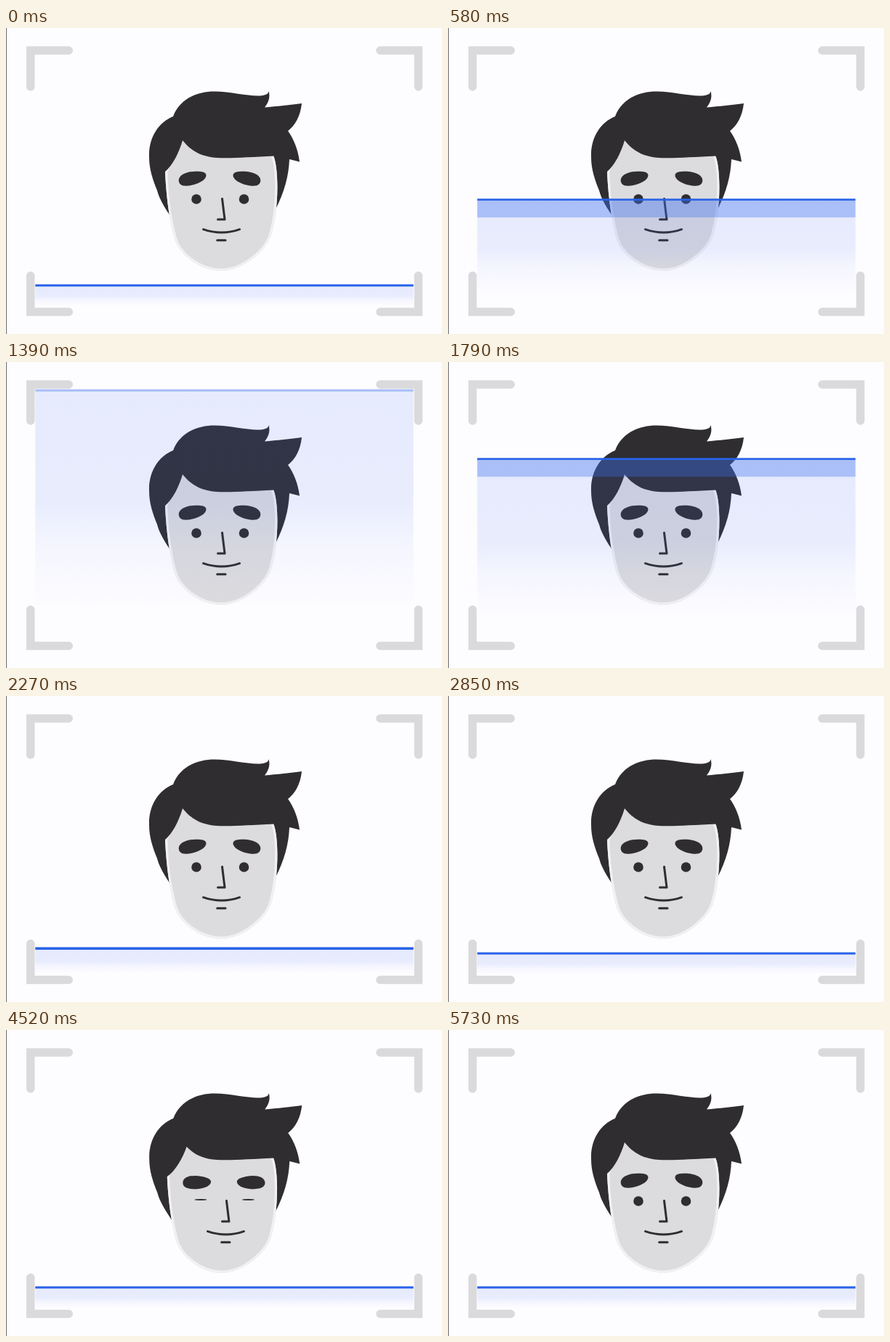
An HTML page that plays this animation: 600x422 px, repeating every 6.09 s.

```html
<!DOCTYPE html>
<html lang="en">
<head>
<meta charset="utf-8">
<title>Face scan</title>
<style>
html, body { margin: 0; width: 100%; height: 100%; overflow: hidden; background: #fdfcff; }
svg { display: block; width: 100%; height: 100%; }
</style>
</head>
<body>
<svg viewBox="0 0 600 422">
  <defs>
    <linearGradient id="fade" x1="0" y1="0" x2="0" y2="1">
      <stop offset="0" stop-color="#3e6cec" stop-opacity=".125"/>
      <stop offset=".52" stop-color="#3e6cec" stop-opacity=".108"/>
      <stop offset=".72" stop-color="#3e6cec" stop-opacity=".045"/>
      <stop offset="1" stop-color="#3e6cec" stop-opacity="0"/>
    </linearGradient>
    <path id="jaw" d="M368 176C376 195 375 250 366 282C360 308 325 335 296 335C266 335 237 312 231 288C224 262 220 225 219 198L240 152H360"/>
    <clipPath id="inside"><use href="#jaw"/></clipPath>
    <path id="brow" d="M-18.800 2.500C-19 -5 -8 -10 5 -10C13 -10 19 -9 19 -4.500C19 3 3 10 -9 10C-16 10 -18.700 6.500 -18.800 2.500Z"/>
    <path id="corner" d="M33.800 81V31H86.300"/>
  </defs>
  <rect width="600" height="422" fill="#fdfcff"/>
  <rect width="1" height="422" fill="#6a6a6d"/>

  <g fill="#2f2d30">
    <path class="hair" d="M230 122C210 130 196 151 197 178C197 195 202 209 208 224C211 236 218 247 231 267L300 210L371 250C383 226 389 205 390 181L380 130Z"/>
    <g id="face">
      <use href="#jaw" fill="#dcdbde"/>
      <use href="#jaw" fill="none" stroke="#f1f0f3" stroke-width="6.6" clip-path="url(#inside)"/>
    </g>
    <path id="lock" d="M205 198H219C229 190 238 172 243 155V125L212 150Z"/>
    <path class="hair" d="M230 122C238 100 260 87.500 287 87.500C315 88 343 97 357 92Q361 91 361.500 87C364 96 361 103 356 109.500C372 108 392 106 407 104C405 122 398 134 388 142C396 153 402 168 404 184.500L390 181L380 185L369 176.500C335 178 310 180 290 179C268 177.500 255 169.500 243 155L222 150Z"/>
    <g id="features">
      <use class="brow" href="#brow"/>
      <use class="brow" href="#brow"/>
      <ellipse class="eye" cx="262"/>
      <ellipse class="eye" cx="327.500"/>
      <g fill="none" stroke="#2f2d30" stroke-width="3" stroke-linecap="round" stroke-linejoin="round">
        <path d="M297.500 235.500L301 264H291.500"/>
        <path d="M271.500 277.700Q297 286.500 321.500 277.700"/>
        <path d="M290.700 292.800H302"/>
      </g>
    </g>
  </g>

  <g fill="none" stroke="#dad9dc" stroke-width="11.500" stroke-linecap="round">
    <use href="#corner"/>
    <use href="#corner" transform="translate(601.3 0) scale(-1 1)"/>
    <use href="#corner" transform="translate(0 422.5) scale(1 -1)"/>
    <use href="#corner" transform="translate(601.3 422.5) scale(-1 -1)"/>
  </g>

  <rect id="glow" x="40.300" width="520.400" fill="url(#fade)"/>
  <rect id="band" x="40.300" width="520.400" height="24.500" fill="#3c6eee"/>
  <rect id="line" x="40.300" width="520.400" fill="#2762e8"/>
</svg>
<script>
const LOOP = 6090, REST = 355, TOP = 39, TURN = 16.5;
const $ = id => document.getElementById(id);
const all = s => document.querySelectorAll(s);
const set = (el, attrs) => { for (const k in attrs) el.setAttribute(k, attrs[k]); };
const clamp = x => Math.max(0, Math.min(1, x));
const mix = (a, b, k) => a + (b - a) * k;

const smooth = (t, a, b) => {
  const x = clamp((t - a) / (b - a));
  return x * x * (3 - 2 * x);
};

// Soft start, steep middle, long settling tail.
const glide = (t, start, time) => {
  const odds = 295 * clamp((t - start) / time) ** 4.28;
  return odds / (1 + odds) * 296 / 295;
};

// Move by (dx, dy) while scaling about the point (x, y).
const warp = (x, y, dx, dy, sx, sy) =>
  `translate(${x + dx} ${y + dy}) scale(${sx} ${sy}) translate(${-x} ${-y})`;

function drawHead(t) {
  const turn = glide(t, 2815, 1180) - glide(t, 4235, 945);
  const blink = smooth(t, 4360, 4490) * (1 - smooth(t, 4550, 4690));
  set($("face"), { transform: warp(374, 0, -turn, 0, 1 - 0.052 * turn, 1) });
  set($("lock"), { transform: warp(219, 198, 7 * turn, 12 * turn, 1 + 0.375 * turn, 1 - 0.07 * turn) });
  set($("features"), { transform: `translate(${TURN * turn})` });
  all(".hair").forEach(h => set(h, { transform: `translate(${0.6 * turn})` }));
  all(".brow").forEach((b, i) => {
    const side = i ? 1 : -1;
    set(b, {
      transform: `translate(${294 + 37.5 * side} ${207.7 + 3 * blink}) scale(${-side} 1) rotate(${12 * blink})`
    });
  });
  all(".eye").forEach(e => set(e, {
    cy: mix(236, 234, blink), rx: mix(6.8, 8.5, blink), ry: mix(6.8, 1.1, blink)
  }));
}

const height = t => glide(t, 330, 1070) - glide(t, 1535, 1180);

function drawScan(t) {
  const lift = height(t);
  const y = mix(REST, TOP, lift);
  const speed = Math.abs(height(t + 5) - height(t - 5)) * (REST - TOP) / 10;
  const thick = 3 + clamp(speed * 12) * (1 - 1.3 * smooth(speed, 0.3, 0.8));
  const dim = smooth(t, 550, 850) * (1 - smooth(t, 1580, 1760));
  set($("glow"), { y, height: 28 + 272 * lift });
  set($("band"), { y, opacity: 0.35 * smooth(speed, 0, 0.75) });
  set($("line"), { y: y - thick / 2, height: thick, opacity: 1 - 0.64 * dim });
}

function frame() {
  const t = performance.now() % LOOP;
  drawHead(t);
  drawScan(t);
  requestAnimationFrame(frame);
}
frame();
</script>
</body>
</html>
```
